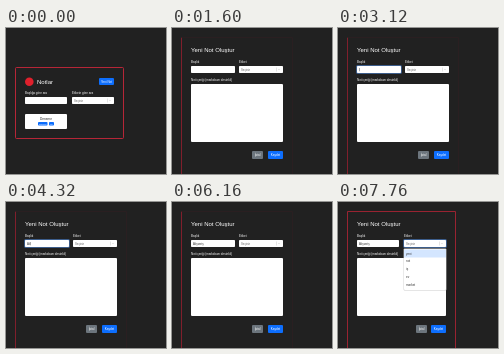
These frames come from a looping animation (160x146 px, 8000 ms). An HTML page with a canvas:

```html
<!DOCTYPE html>
<html lang="tr">
<head>
<meta charset="utf-8">
<style>
  html, body { margin: 0; width: 100%; height: 100%; overflow: hidden; background: #212121; }
  canvas { display: block; width: 160px; height: 146px; }
</style>
</head>
<body>
<canvas id="stage"></canvas>
<script>
const LOOP = 8000;
const RED = '#c8283a', BLUE = '#0d6efd', GRAY = '#6c757d', INK = '#333';
const TITLE = 'Alışveriş';
const KEY_TIMES = [3760, 4000, 4320, 4640, 4720, 4880, 5040, 5120, 5200];
const TAGS = ['yeni', 'not', 'iş', 'ev', 'market'];

const canvas = document.getElementById('stage');
const ctx = canvas.getContext('2d');
const scale = window.devicePixelRatio || 1;
canvas.width = 160 * scale;
canvas.height = 146 * scale;

const progress = (t, from, to) => Math.min(1, Math.max(0, (t - from) / (to - from)));

function box(x, y, w, h, fill, radius = 0.8) {
  ctx.fillStyle = fill;
  ctx.beginPath();
  ctx.roundRect(x, y, w, h, radius);
  ctx.fill();
}

function text(value, x, y, size = 3, color = '#fff', align = 'left') {
  ctx.font = `${size}px "Liberation Sans", Arial, sans-serif`;
  ctx.fillStyle = color;
  ctx.textAlign = align;
  ctx.fillText(value, x, y);
}

function button(label, x, y, w, h, fill) {
  box(x, y, w, h, fill, 1);
  text(label, x + w / 2, y + h / 2 + 1, 3, '#fff', 'center');
}

function field(x, y, w, h, focus = 0) {
  if (focus > 0) box(x - 0.7, y - 0.7, w + 1.4, h + 1.4, `rgba(90,155,250,${focus * 0.65})`, 1.3);
  box(x, y, w, h, '#fff');
}

function select(value, x, y, w, focus = 0) {
  field(x, y, w, 7, focus);
  text(value, x + 2, y + 4.6, 2.8, '#666');
  const right = x + w - 4;
  ctx.strokeStyle = '#bbb';
  ctx.lineWidth = 0.4;
  ctx.beginPath();
  ctx.moveTo(right - 2.5, y + 1.5);
  ctx.lineTo(right - 2.5, y + 5.5);
  ctx.moveTo(right - 0.8, y + 3);
  ctx.lineTo(right, y + 3.9);
  ctx.lineTo(right + 0.8, y + 3);
  ctx.stroke();
}

function drawList(t) {
  ctx.strokeStyle = RED;
  ctx.lineWidth = 0.9;
  ctx.beginPath();
  ctx.roundRect(9.5, 39.5, 108, 71, 1);
  ctx.stroke();

  box(19, 49.5, 8.6, 8.6, '#e0202c', 4.3);
  text('Notlar', 31, 55.5, 6);
  const hover = progress(t, 80, 480);
  button('Yeni Not', 93, 50, 15, 7, `rgb(${13 - 2 * hover},${110 - 16 * hover},${253 - 38 * hover})`);

  text('Başlığa göre ara', 19, 66.2);
  text('Etikete göre ara', 66, 66.2);
  field(19, 69, 42, 7);
  select('Seçiniz', 66, 69, 42);

  box(19, 86, 42, 15, '#fff', 1);
  text('Deneme', 40, 92, 3.2, '#222', 'center');
  box(32, 94, 9.5, 3.6, BLUE);
  box(43, 94, 5, 3.6, BLUE);
  text('market', 36.75, 96.6, 2.4, '#fff', 'center');
  text('ev', 45.5, 96.6, 2.4, '#fff', 'center');
}

function drawForm(t) {
  const narrow = t >= 6880;
  const right = narrow ? 108 : 111;
  const fieldWidth = narrow ? 42 : 44;
  const selectX = right - fieldWidth;

  const edge = (x1, y1, x2, y2, color) => {
    ctx.strokeStyle = color;
    ctx.lineWidth = 0.9;
    ctx.beginPath();
    ctx.moveTo(x1, y1);
    ctx.lineTo(x2, y2);
    ctx.stroke();
  };
  const side = right + 9.5;
  edge(9.5, 9.5, 9.5, 146, narrow ? '#a82434' : '#8c202e');
  edge(9.5, 9.5, side, 9.5, narrow ? '#a82434' : '#2c2022');
  edge(side, 9.5, side, 146, narrow ? '#a82434' : '#2c2022');

  text('Yeni Not Oluştur', 19, 24, 6);
  text('Başlık', 19, 35.2);
  text('Etiket', selectX, 35.2);

  const titleFocus = progress(t, 2480, 2720) * (1 - progress(t, 5680, 5840));
  field(19, 38, fieldWidth, 7, titleFocus);
  const typed = TITLE.slice(0, KEY_TIMES.filter(key => t >= key).length);
  text(typed, 21, 42.6, 2.8, INK);
  if (titleFocus === 1 && t % 1000 < 500) {
    const caret = 21.2 + ctx.measureText(typed).width;
    box(caret, 40, 0.4, 3.2, INK, 0);
  }

  select('Seçiniz', selectX, 38, fieldWidth, progress(t, 6960, 7040));
  text('Not içeriği (markdown destekli)', 19, 53.2);
  box(19, 56, right - 19, 58, '#fff', 1);
  button('İptal', right - (narrow ? 30 : 31), 123, 11, 8, GRAY);
  button('Kaydet', right - 15, 123, 15, 8, BLUE);

  if (t >= 6960) {
    box(selectX - 0.4, 46.6, fieldWidth + 0.8, 41.8, '#ccc', 1);
    box(selectX, 47, fieldWidth, 41, '#fff', 1);
    box(selectX, 47.5, fieldWidth, 8, '#d4e6ff', 0);
    TAGS.forEach((tag, i) => text(tag, selectX + 2, 52.5 + i * 7.9, 3, INK));
  }
}

function frame(now) {
  const t = now % LOOP;
  ctx.setTransform(scale, 0, 0, scale, 0, 0);
  ctx.fillStyle = '#212121';
  ctx.fillRect(0, 0, 160, 146);
  if (t < 1600) drawList(t);
  else drawForm(t);
  requestAnimationFrame(frame);
}
requestAnimationFrame(frame);
</script>
</body>
</html>
```
